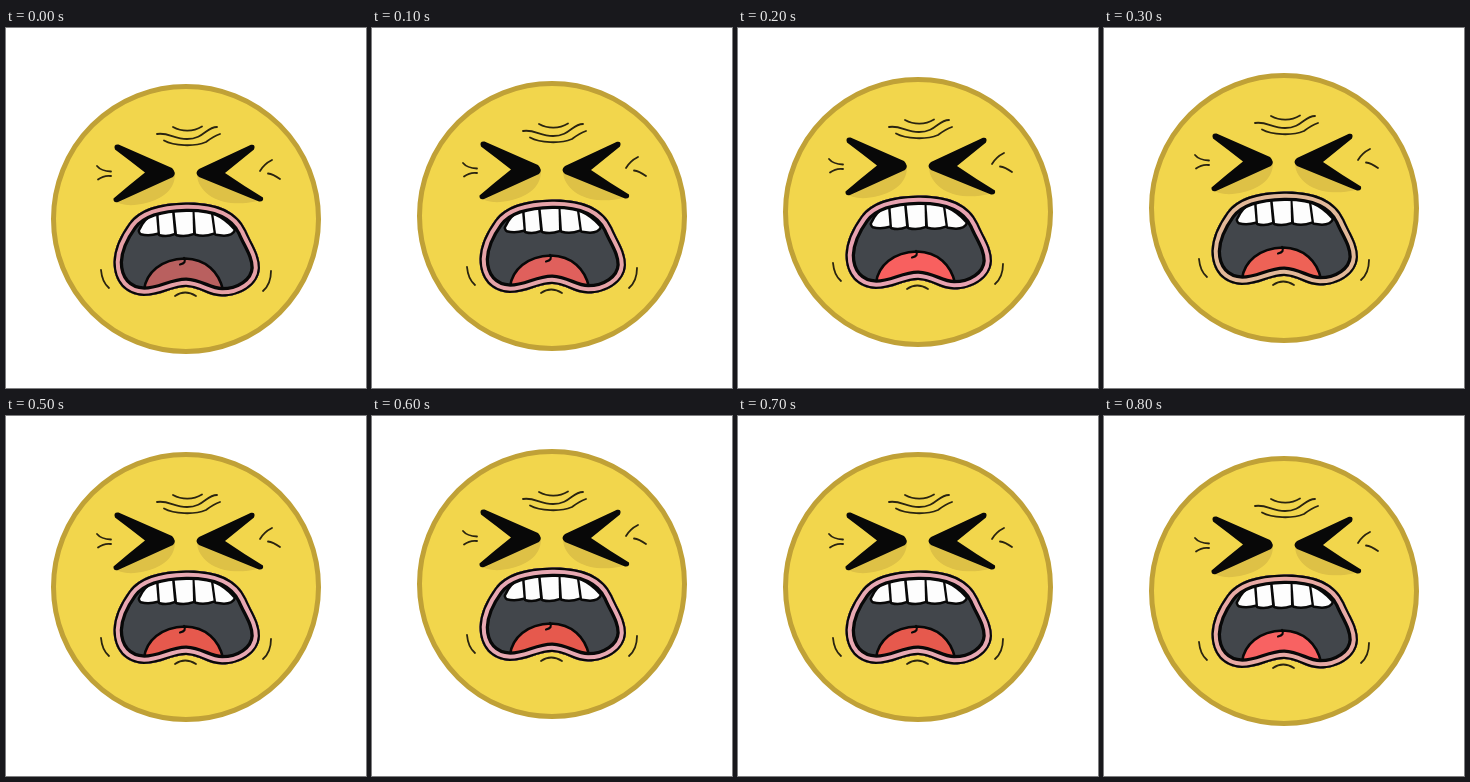
An HTML page with a canvas that plays this animation: 360x360 px, repeating every 900 ms.

```html
<!DOCTYPE html>
<html lang="en">
<head>
<meta charset="utf-8">
<title>Wailing face</title>
<style>
html, body { margin: 0; width: 100%; height: 100%; overflow: hidden; background: #fff; }
canvas { display: block; width: 360px; height: 360px; }
</style>
</head>
<body>
<canvas id="stage" width="360" height="360"></canvas>
<script>
const ctx = document.getElementById('stage').getContext('2d');
const STEP = 100;
const BASE_Y = 171;

// One entry per step: height of the face centre, tongue and lip colours.
const POSES = [
  [191, '#b9605f', '#e6a0a6'],
  [188, '#e0605c', '#e6a3a8'],
  [184, '#f8605f', '#e8a2b0'],
  [180, '#ee6256', '#e2b898'],
  [175, '#ec5e54', '#e6aaa8'],
  [171, '#e6594d', '#e8a8b2'],
  [168, '#e6594d', '#e8a8b2'],
  [171, '#e6594d', '#e8a8b2'],
  [175, '#f86262', '#e8a9a4']
];

const INK = '#080808';

const mouth = new Path2D('M180 154.5 C212 154 231 163 240 182 C246 196 254 206 254 220 ' +
  'C253 238 234 248.5 216 248.5 C201 248 194 239.5 180 239 C166 239 155 248 138 248 ' +
  'C119 247 107.5 234 107.5 214 C108 199 115 186 123 175 C134 160 154 155 180 154.5 Z');

const eyes = new Path2D(
  'M112.5 96.5 L166 120 Q171 125 167 129 L112 154 Q107 155 107.5 150.5 ' +
  'Q122 138 139 124.5 Q123 112 109 101.5 Q107 96 112.5 96.5 Z ' +
  'M245 96.8 L193 121 Q188 125 193 129 L253 153.5 Q258 154 257 149.5 ' +
  'Q238 138 219 125 Q235 112 248 101.5 Q250 96 245 96.8 Z');

const shadows = new Path2D(
  'M169 126 C169 142 156 151 140 155 C125 159 113 157 108 152 Z ' +
  'M191 126 C191 140 205 153 225 155 C240 156 250 154 256 151 Z');

const wrinkles = new Path2D(
  'M167 79 C176 84 187 84 196 78.5 ' +
  'M151 86 C162 84 168 91 181 91 C198 91 200 79 211 79 ' +
  'M158 92.5 C168 98 188 99 200 94 Q208 88 214 86 ' +
  'M91 118 Q95 123 105 123.5 M92 131.5 Q98 127 105 128 ' +
  'M254 123 Q258 116 266 112 M262 125.5 Q267 126 274 131 ' +
  'M95 222 Q96 234 103 240 M265 223 Q265 236 257 243 ' +
  'M169 248 Q179 241 190 248');

const teeth = [
  'M134 183 Q139 171 150 166 L151.5 184.5 Q143 187 135 185 Z',
  'M152.5 165.5 Q158 163 166 163 L168 185 Q161 188 154 186 Z',
  'M168.5 162.5 Q177 161 186.5 162.5 L187 185 Q179 188 171 186 Z',
  'M188.5 163 Q198 163 205 166 L207.5 184.5 Q198 188 190 185.5 Z',
  'M207.5 167 Q219 172 227.5 182 Q226 186 218 186.5 L210 185.5 Z'
].map(d => new Path2D(d));

const tongue = new Path2D('M138 242 C140 225 155 211 179 210.5 C200 211 213 224 217 242 Z');
const crease = new Path2D('M178 210 Q181 215 174 216.5');

function stroke(path, color, width) {
  ctx.strokeStyle = color;
  ctx.lineWidth = width;
  ctx.stroke(path);
}

function fill(path, color) {
  ctx.fillStyle = color;
  ctx.fill(path);
}

function drawMouth(tongueColor, lipColor) {
  ctx.save();
  ctx.clip(mouth);
  fill(mouth, '#42464b');
  for (const tooth of teeth) {
    stroke(tooth, INK, 5);
  }
  for (const tooth of teeth) {
    fill(tooth, '#fdfdfd');
  }
  fill(tongue, tongueColor);
  stroke(tongue, INK, 2.6);
  stroke(crease, INK, 2.2);
  // Only the inner half of each stroke survives the clip.
  stroke(mouth, INK, 19);
  stroke(mouth, lipColor, 12.4);
  stroke(mouth, INK, 4.4);
  ctx.restore();
}

function draw(time) {
  const [y, tongueColor, lipColor] = POSES[Math.floor(time / STEP) % POSES.length];
  ctx.fillStyle = '#fff';
  ctx.fillRect(0, 0, 360, 360);

  ctx.save();
  ctx.translate(0, y - BASE_Y);
  ctx.lineCap = ctx.lineJoin = 'round';

  const face = new Path2D();
  face.arc(180, BASE_Y, 132.5, 0, Math.PI * 2);
  fill(face, '#f2d64c');
  stroke(face, '#c0a137', 5);

  fill(shadows, '#dec146');
  fill(eyes, INK);
  stroke(wrinkles, '#2a2410', 1.8);
  drawMouth(tongueColor, lipColor);
  ctx.restore();
}

const start = performance.now();

function tick() {
  draw(performance.now() - start);
  requestAnimationFrame(tick);
}

tick();
</script>
</body>
</html>
```
